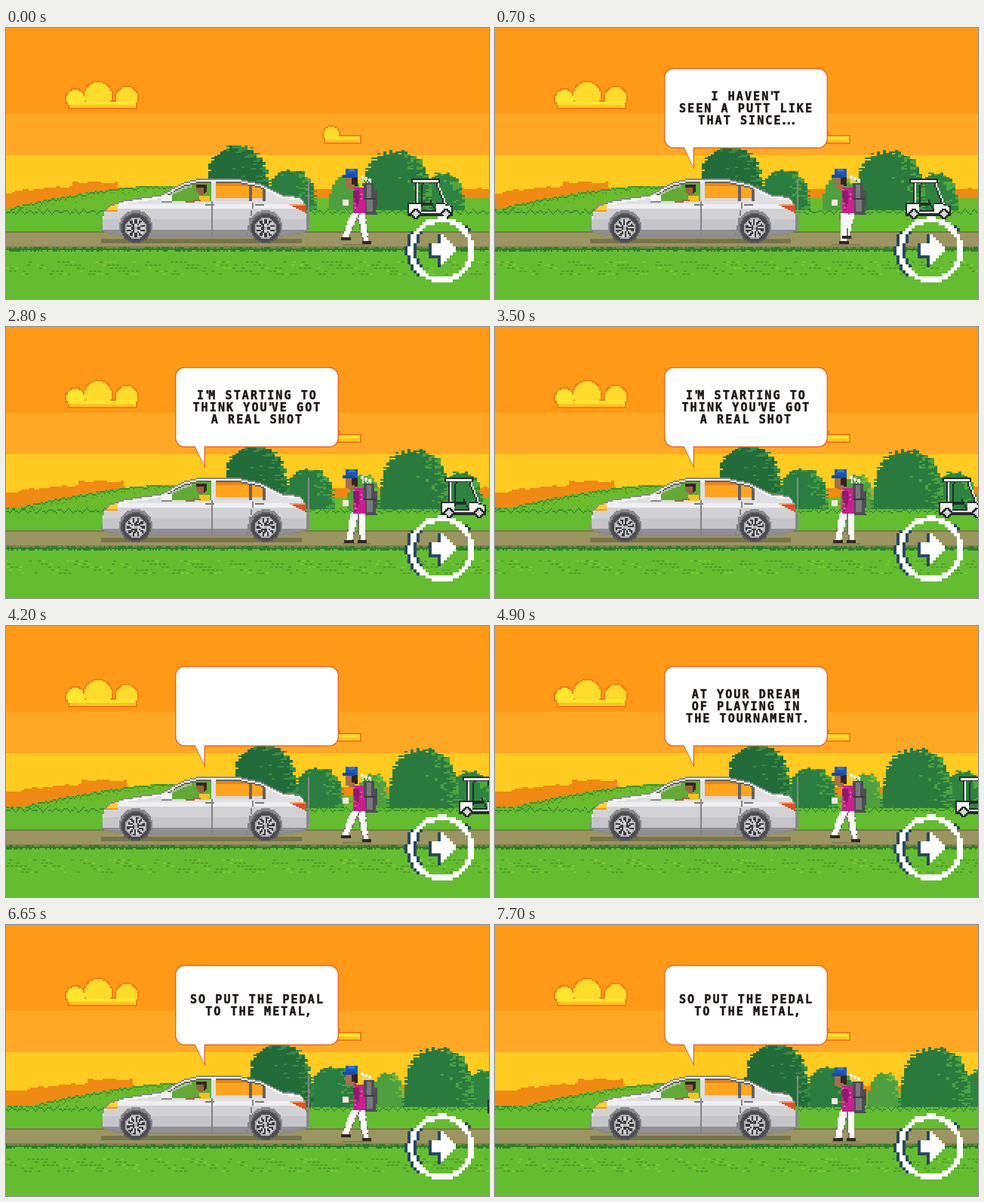
An HTML page with a canvas that plays this animation: 640x360 px, repeating every 8000 ms.

```html
<!DOCTYPE html>
<html lang="en">
<head>
<meta charset="utf-8">
<title>Pixel drive</title>
<style>
html, body { margin: 0; width: 100%; height: 100%; overflow: hidden; background: #ff9917; }
canvas, svg { position: absolute; left: 0; top: 0; width: 640px; height: 360px; }
text { font: bold 15px "DejaVu Sans Mono", "Liberation Mono", monospace; letter-spacing: 2.1px; text-anchor: middle; fill: #1c1614; stroke: #1c1614; stroke-width: .5px; white-space: pre; }
.mark { letter-spacing: -3px; }
</style>
</head>
<body>
<canvas id="scene" width="640" height="360"></canvas>
<svg viewBox="0 0 640 360"><g id="speech"></g></svg>
<script>
const ctx = document.getElementById('scene').getContext('2d');
const speech = document.getElementById('speech');
const LOOP = 8000, STEP = 350, LAST = 22, PX = 2;

const snap = (v, s = PX) => Math.round(v / s) * s;
const clamp = v => Math.max(0, Math.min(1, v));
const hash = (x, y = 0) => {
  const n = Math.sin(x * 127.1 + y * 311.7) * 43758.5453;
  return n - Math.floor(n);
};

function box(color, x, y, w, h) {
  ctx.fillStyle = color;
  ctx.fillRect(x, y, w, h);
}

function at(x, y, draw) {
  ctx.save();
  ctx.translate(snap(x), snap(y));
  draw();
  ctx.restore();
}

// Visits coarse cells of a rectangle; pick(x, y) returns a colour or nothing.
function cells(x0, y0, x1, y1, pick, s = PX) {
  for (let y = y0; y < y1; y += s)
    for (let x = x0; x < x1; x += s) {
      const color = pick(x + s / 2, y + s / 2);
      if (color) box(color, x, y, s, s);
    }
}

function disc(cx, cy, r, pick) {
  cells(cx - r, cy - r, cx + r, cy + r, (x, y) => {
    const dx = x - cx, dy = y - cy, d = Math.hypot(dx, dy);
    return d <= r && (typeof pick === 'string' ? pick : pick(dx, dy, d));
  });
}

// A straight stroke whose width changes from w1 to w2.
function limb(color, x1, y1, x2, y2, w1 = PX, w2 = w1) {
  const n = Math.ceil(Math.max(Math.abs(x2 - x1), Math.abs(y2 - y1)) / PX);
  for (let i = 0; i <= n; i++) {
    const k = i / n, w = snap(w1 + (w2 - w1) * k);
    box(color, snap(x1 + (x2 - x1) * k - w / 2), snap(y1 + (y2 - y1) * k), w, PX);
  }
}

function cloud(x, w, bottom, puffs) {
  const layer = (color, inset) => {
    ctx.save();
    ctx.beginPath();
    ctx.rect(x - 20, 0, w + 40, bottom - inset);
    ctx.clip();
    puffs.forEach(([px, r]) => disc(x + px, bottom - 14 - (r - 14) / 1.6, r - inset, color));
    box(color, x + 4 + inset, bottom - 12 + inset, w - 8 - 2 * inset, 12);
    ctx.restore();
  };
  layer('#f27a1b', 0);
  layer('#ffe52d', 2);
  box('#ffc321', x + 6, bottom - 6, w - 14, 4);
}

function sky() {
  box('#ff9917', 0, 0, 640, 114);
  box('#ffa826', 0, 114, 640, 55);
  box('#ffcb20', 0, 169, 640, 90);
  cloud(78, 100, 108, [[14, 14], [44, 20], [82, 16]]);
  cloud(417, 58, 154, [[14, 12], [44, 4]]);
}

const ridgeTop = x => x < 148 ? 220 - 9 * clamp(x / 62) - 5 * (x > 86) : 213;
const hillTop = x => 210 + 30 * clamp(1 - x / 190) ** 1.5;

function hills(step) {
  for (let x = 0; x < 640; x += PX) {
    const rx = x - snap(step), hx = x - snap(step * 1.7);
    const ridge = snap(ridgeTop(rx) - 2 * (hash(Math.floor(rx / 6)) > .7));
    box('#f08a14', x, ridge, PX, 40);
    const hill = snap(hillTop(hx) + 16 * clamp((x - 240) / 90));
    box('#6cbb2e', x, hill, PX, 50);
    if (x > 350) continue;
    box('#3c9130', x, hill + 2 * (hash(hx, 1) > .6), PX, PX);
    if (hash(hx, 3) > .65) box('#51a22e', x, hill + 2 + snap(hash(hx, 7) * 6), 4, PX);
  }
}

// A dome of leaves with ragged edges, lit from the upper right.
function bush(cx, w, top, dark, light) {
  const h = 250 - top;
  for (let y = snap(top) - 4; y < 246; y += PX)
    for (let x = snap(cx - w / 2) - 4; x < cx + w / 2 + 4; x += 4) {
      const u = (x + 2 - cx) / (w / 2), v = (250 - y) / h, n = hash(x, y);
      const depth = 1 - Math.abs(u) ** 2.6 - v ** 3;
      if (depth + n * .22 < .12) continue;
      const leaf = hash(Math.floor((x + y) / 6), Math.floor(y / 4));
      box(leaf * .6 + n * .3 + u * .3 + v * .25 - depth * .2 > .82 ? light : dark, x, y, 4, PX);
    }
}

function bushes(step) {
  at(step * 2.97, 0, () => {
    bush(450, 44, 196, '#4f9f40', '#74b93c');
    bush(378, 68, 188, '#2a7c40', '#46a040');
    bush(307, 88, 156, '#226b3a', '#378c44');
    bush(580, 56, 192, '#2e8340', '#50a83f');
    bush(518, 94, 163, '#2a7a3e', '#4ba23f');
  });
}

function ground(step) {
  const shift = step * 14;
  box('#64bd31', 0, 242, 640, 118);
  box('#77764a', 0, 270, 640, 2);
  box('#9b9561', 0, 272, 640, 20);
  box('#827f50', 0, 290, 640, 3);
  for (let x = 0; x < 640; x += PX) {
    const k = (x - shift) / PX;
    const wave = Math.abs((k % 6 + 6) % 6 - 3);
    box('#3a9030', x, 240 + PX * Math.round(wave * .8 + hash(k)), PX, PX);
    box('#2c7f2a', x, 293, PX, hash(k, 2) > .5 ? 4 : 2);
    if (hash(k, 3) > .6) box('#2c7f2a', x, 291, PX, PX);
  }
  for (let i = 0; i < 320; i++) {
    const x = (i * 10 + shift) % 656 - 8;
    if (hash(i, 5) > .35) box(hash(i) > .75 ? '#7fc934' : '#519f29', x, 310 + 4 * (i % 5), 4, PX);
  }
}

function cart(step) {
  const ink = '#252c2c', white = '#f8f8f4';
  at(step * 5.6, 0, () => {
    box(ink, 537, 200, 38, 6);
    box(white, 539, 202, 34, 3);
    limb(ink, 542, 206, 542, 236);
    limb(white, 544, 206, 544, 232);
    limb(ink, 552, 206, 550, 236);
    limb(ink, 570, 206, 582, 236);
    limb(white, 572, 206, 584, 236);
    limb(ink, 562, 228, 570, 242);
    box(ink, 548, 232, 16, 4);
    // The tub dips between seat and bonnet.
    const tub = x => 244 - 10 * (x < 550 || x > 570) + 4 * clamp((x - 578) / 12);
    cells(532, 230, 592, 250, (x, y) => y > tub(x) - 2 &&
      (y < tub(x) || y > 246 || x < 534 || x > 590 ? ink : white));
    [543, 583].forEach(x => disc(x, 247, 7, (dx, dy, d) => d > 4 ? ink : '#dadada'));
  });
}

const OUTLINE = [[127, 262], [130, 242], [140, 234], [156, 229], [206, 221], [236, 205], [256, 200],
  [312, 201], [338, 207], [366, 221], [390, 224], [398, 236], [400, 262]];

function roof(x) {
  const i = Math.max(1, OUTLINE.findIndex(p => p[0] >= x));
  const [x1, y1] = OUTLINE[i - 1], [x2, y2] = OUTLINE[i];
  return y1 + (y2 - y1) * (x - x1) / (x2 - x1);
}

const PAINT = [[234, '#e0e0e3'], [240, '#f0f0f2'], [254, '#d2d2d5'], [268, '#c6c6ca'], [290, '#8f8f94']];

function carColor(x, y) {
  const top = roof(x), bottom = 278 - 9 * (Math.abs(x - 263) / 137) ** 8;
  if (y < top || y > bottom) return;
  if (y < top + 2 || y > bottom - 2 || x < 129 || x > 398) return '#88888c';
  const front = x > 214 && x < 272, rear = x > 278 && x < 344;
  if ((front || rear) && y > top + 4 && y < 231) {
    if (y < top + 6 || y > 229 || x > 340 || Math.abs(x - 324) < 2) return '#67625e';
    if (front) return x < 246 && y < top + 9 ? '#a9c39c' : '#62aa35';
    return y > 226 ? '#d9d9dc' : y < 210 ? '#e58716' : '#ffa41f';
  }
  if (x < 148 && y > 234 && y < 244) return y > 241 ? '#ff9128' : '#ffd035';
  if (x > 376 && y > 233 && y < 234 + (x - 374) / 2) return y < 237 ? '#ff9a55' : '#d8542d';
  if (y < top + 5) return '#f6f6f7';
  if (y > 230 && (Math.abs(x - 273) < 1 || Math.abs(x - 328 + (y - 231) / 5) < 1)) return '#828287';
  if (y < 236 && y > 233 && x % 66 < 12 && x > 260) return '#77777c';
  return PAINT.find(([limit]) => y < limit)[1];
}

function wheel(x, y, turn) {
  disc(x, y - 2, 22, (dx, dy) => dy < 6 && '#8a8a8e');
  disc(x, y, 20, (dx, dy, d) => {
    if (d > 14) return d > 18 ? '#5c5c60' : '#4b4b4f';
    if (d > 12 || d < 3) return '#b0b0b4';
    return Math.cos(10 * (Math.atan2(dy, dx) + turn)) > 0 ? '#cfcfd2' : '#3a3a3e';
  });
}

function car(step) {
  box('#77734b', 126, 280, 266, 6);
  cells(126, 200, 402, 280, carColor);
  // Driver and mirror
  disc(259, 215, 7, dx => dx > 2 ? '#3a2a20' : '#96683f');
  box('#33261e', 252, 208, 14, 4);
  box('#f4c322', 256, 223, 14, 8);
  limb('#9b6a42', 240, 230, 256, 228, 4);
  box('#f4f4f5', 206, 222, 14, 8);
  box('#88888c', 206, 230, 14, 2);
  [172, 344].forEach(x => wheel(x, 266, -step * .9));
}

// Spread of the legs over one walking cycle: 1 is a full stride.
const SPREAD = [1, .6, 0, .6, 0, 1, .6];

function walker(step) {
  const spread = SPREAD[step % SPREAD.length];
  const white = '#fbfaf6', shoe = '#2f2625', skin = '#a56f49', pink = '#c9218f';
  const front = 462 - 13 * spread, back = 466 + 11 * spread;
  const frontY = spread === 1 ? 278 : 283, backY = spread ? 283 : 276;
  box('#827e52', 446, 287, 38, 2);
  limb('#77736d', 470, 246, back, backY, 12, 8);
  limb(white, 471, 246, back, backY, 10, 6);
  limb('#77736d', 463, 246, front, frontY, 12, 8);
  limb(white, 462, 246, front, frontY, 10, 8);
  box(shoe, snap(front) - 6, frontY, 13, 4);
  box(shoe, snap(back) - 6, backY, 12, 4);
  at(0, spread === .6 ? 2 : 0, () => {
    // Clubs and bag
    for (let i = 0; i < 3; i++) {
      limb('#cfdcb8', 472 + i * 5, 196 + 4 * hash(i), 475 + i * 4, 210);
      box('#eef0dd', 470 + i * 5, 196 + snap(4 * hash(i)), 4, 4);
    }
    limb('#4d4d53', 480, 205, 483, 246, 14, 16);
    limb('#77777c', 480, 208, 482, 242, 6, 8);
    box('#4d4d53', 488, 216, 4, 22);
    box('#38383d', 474, 226, 16, 2);
    // Head
    box('#33241f', 457, 198, 9, 12);
    box(skin, 450, 198, 8, 14);
    box(skin, 454, 208, 8, 6);
    box('#1d57b9', 450, 187, 16, 11);
    box('#2f79dc', 454, 187, 8, 4);
    box('#174a9f', 446, 195, 16, 4);
    // Shirt and arm
    limb(pink, 466, 212, 468, 244, 14, 16);
    for (let i = 0; i < 10; i++)
      box(i % 2 ? '#8f196d' : '#e863b8', 460 + snap(12 * hash(i)), 214 + i * 3, PX, PX);
    limb('#8f196d', 464, 216, 464, 232, 8, 6);
    limb(skin, 462, 232, 452, 232, 4);
    box('#f2e8df', 446, 228, 8, 8);
  });
}

function button() {
  const ink = '#29495d', white = '#ffffff', size = 4;
  const ring = (x, y) => Math.abs(Math.hypot(x - 577, y - 295) - 40) < 3.4;
  // Arrow: a shaft followed by a tapering head.
  const arrow = (x, y) => x > 562 && Math.abs(y - 294) < (x < 576 ? 10 : Math.min(20, 600 - x));
  cells(528, 250, 628, 342, (x, y) => {
    if (ring(x, y) || arrow(x, y)) return white;
    if (arrow(x + size, y - size) || arrow(x + size, y)) return ink;
    const side = Math.abs(x - 577) > 24;
    if (side && (ring(x + size, y) || ring(x - size, y)) && Math.abs(y - 295) < 34) return x < 577 === y > 270 && ink;
  }, size);
}

function bubble() {
  const shape = (color, inset) => {
    ctx.fillStyle = color;
    ctx.beginPath();
    ctx.roundRect(224 + inset, 53 + inset, 217 - 2 * inset, 107 - 2 * inset, 13 - inset);
    ctx.fill();
    ctx.beginPath();
    ctx.moveTo(249 + inset, 158);
    ctx.lineTo(264 - inset, 158);
    ctx.lineTo(264 - inset, 188 - 3 * inset);
    ctx.fill();
  };
  shape('#ee621f', 0);
  shape('#ffffff', 1.4);
}

// Each phrase starts at its step and clears one step before the next.
const PHRASES = [
  [1, "I HAVEN'T", 'SEEN A PUTT LIKE', 'THAT SINCE...'],
  [6, 'SINCE...', 'WELL EVER!'],
  [8, "I'M STARTING TO", "THINK YOU'VE GOT", 'A REAL SHOT'],
  [13, 'AT YOUR DREAM', 'OF PLAYING IN', 'THE TOURNAMENT.'],
  [18, 'SO PUT THE PEDAL', 'TO THE METAL,']
];

function talk(step) {
  const index = PHRASES.findLastIndex(([start]) => start <= step);
  const next = PHRASES[index + 1];
  if (index < 0 || next && step === next[0] - 1) return speech.replaceChildren();
  const lines = PHRASES[index].slice(1);
  speech.innerHTML = lines.map((words, i) => {
    const marked = words.replace(/[.,!']+/g, '<tspan class="mark" dx="-2">$&</tspan>');
    return `<text x="333" y="${120 - 8 * lines.length + 16 * i}">${marked}</text>`;
  }).join('');
}

function draw(step) {
  sky();
  hills(step);
  bushes(step);
  ground(step);
  cart(step);
  car(step);
  walker(step);
  button();
  if (step > 0) bubble();
  talk(step);
}

let shown = -1;
function tick() {
  const step = Math.min(LAST, Math.floor(performance.now() % LOOP / STEP));
  if (step !== shown) draw(shown = step);
  requestAnimationFrame(tick);
}
tick();
</script>
</body>
</html>
```
